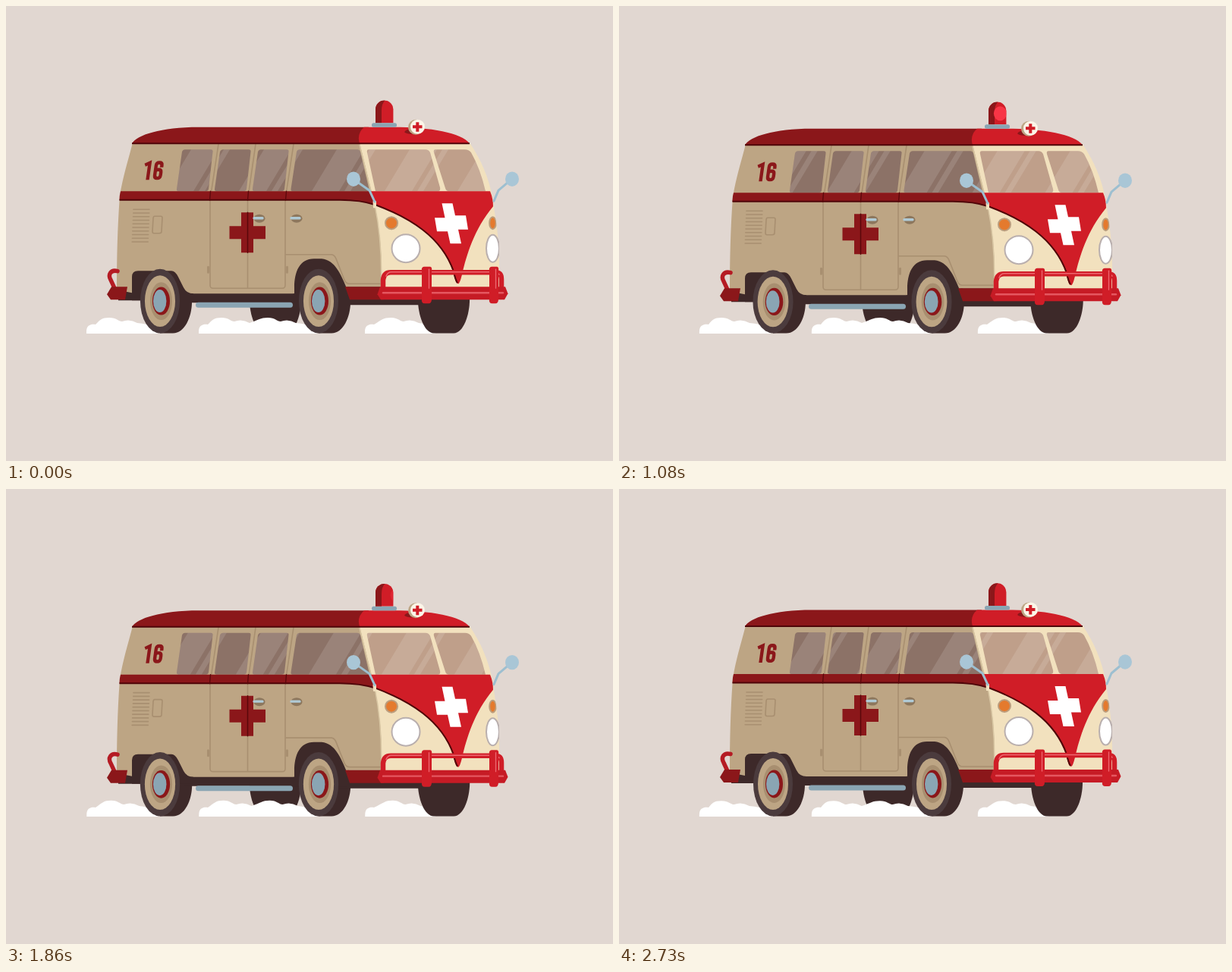
These frames come from a looping animation (800 px wide and 600 px high, 2760 ms). An HTML page:

```html
<!DOCTYPE html>
<html lang="en">
<head>
<meta charset="utf-8">
<title>Ambulance van</title>
<style>
  html, body { margin: 0; width: 100%; height: 100%; overflow: hidden; background: #e1d7d1; }
  svg { display: block; width: 100vw; height: 100vh; }
  .red { fill: #d01d27; }
  .maroon { fill: #8b171a; }
  .tan { fill: #bda584; }
  .dark { fill: #3d2929; }
  .cream { fill: #f2e1be; }
  .steel { fill: #8aa5b3; }
  .line { fill: none; stroke-linecap: round; stroke-linejoin: round; }
  .seam { stroke: #a88f70; stroke-width: 1.6; }
  .edge { stroke: #4f0509; stroke-width: 2; stroke-linecap: butt; }
  .chrome { stroke: #9dbfd0; stroke-width: 3; }
</style>
</head>
<body>
<svg viewBox="0 0 800 600" role="img" aria-label="Ambulance van number 16">
  <defs>
    <pattern id="glare" width="96" height="60" patternUnits="userSpaceOnUse">
      <path d="M0 0h36v60h-36zM43 0h8v60h-8z" fill="#fff" opacity=".12"/>
    </pattern>
    <clipPath id="dome"><path d="M487 154V136a11.7 11.7 0 0 1 23.4 0V154z"/></clipPath>
    <clipPath id="nose"><path d="M600 181H611C626 202 637 228 641 252L650 310V374H600z"/></clipPath>
    <path id="tread" class="dark" d="M0-42.5H17C32-42.5 42-22 42 0S32 42.5 17 42.5H0z"/>
    <g id="face">
      <ellipse rx="26" ry="42.5" fill="#4b3b3d"/>
      <ellipse rx="20" ry="34" class="tan"/>
      <ellipse cx="1.5" rx="14.5" ry="25" fill="#a88f70"/>
      <ellipse cx="1.5" rx="11.5" ry="18.5" class="maroon"/>
      <ellipse cx="-.3" rx="8.7" ry="15" class="steel"/>
    </g>
    <path id="farWheel" class="dark" d="M-34-20V-2C-34 18-26 42.500-13 42.500H13C26 42.500 34 18 34-2V-20z"/>
  </defs>
  <rect width="800" height="600" fill="#e1d7d1"/>

  <g data-wheel="355"><use href="#farWheel"/></g>
  <g id="smoke" fill="#fff"></g>
  <g data-wheel="577"><use href="#farWheel"/></g>
  <g data-wheel="203"><use href="#tread"/></g>
  <g data-wheel="412"><use href="#tread"/></g>

  <g id="van">
    <path class="dark" d="M148 370H548V394H385V391H235V388H148z"/>
    <rect class="steel" x="250" y="390.5" width="128" height="7" rx="3.5"/>

    <path class="tan" d="M167 180H468L490 262C494 290 496 330 494 370H452L378 379H243L166 378L146 374C146 330 147 290 150 250C154 225 161 203 167 180z"/>
    <path class="dark" d="M166 379V357Q166 349 174 349H218Q223 349 227 357L234 371Q238 379 247 379V388H166z"/>
    <path class="dark" d="M380 392V371C380 350 387 333 406 333H416C434 335 441 353 450 374V392z"/>
    <path class="maroon" d="M447 370H498V387H453z"/>
    <path class="line" d="M147 349.500C138 347 134 354 138 361L144 374" stroke="#b51b24" stroke-width="5.500"/>
    <path class="maroon" d="M139 370H160L157 387H138L133 380z"/>

    <g class="line seam">
      <path d="M280 182L269 255V368Q269 372 273 372H364Q368 372 368 368V255L379 182M329 182L318.500 255V372"/>
      <path d="M369 327.500H429Q433 328 435 333L446 361Q448 366 453 366H493"/>
      <path d="M196 277H204Q206 277 206 279L205 297Q205 299.500 202 299.500H195Q193 299.500 193 297L194 280Q194 277 196 277z"/>
      <path d="M266.500 344V351M370.500 344V351" stroke-width="3"/>
      <g id="vents"></g>
    </g>

    <path class="cream" d="M466 180H611C626 202 637 228 641 252L643 265Q650 305 650 340V373H495Q497 315 486 262z"/>
    <path class="line" d="M466 183Q476 225 486 262Q496 310 494.500 370" stroke="#d8c6a3" stroke-width="1.500"/>

    <g id="windows"></g>

    <path class="maroon" d="M151 244H480L487 262C470 257 460 255.500 440 255.500H149.500Q149.500 249 151 244z"/>
    <path class="red" d="M479 244H638Q642 253 642 264C617 294 607 328 601 354Q598 366 596 366Q592 366 590 352C574 304 532 279 487 262z"/>
    <path class="line edge" d="M149.500 255.500H440C462 255.500 475 258 487 262C532 279 574 304 590 350Q592 360 595 365"/>
    <path class="line" d="M269.500 244L268.500 256M319.500 244L318.500 256M369.500 244L368.500 256" stroke="#5a080b" stroke-width="1.300"/>

    <path class="maroon" d="M166 181C172 170 204 159.500 254 159.500H478V181z"/>
    <path class="red" d="M472 159.500H510C560 159.500 600 167 611 181H466Q462 168 472 159.500z"/>
    <path class="line edge" d="M166 181H611"/>

    <g class="line" stroke="#8b171a" stroke-width="4.400" stroke-linecap="butt" transform="translate(182 204) skewX(-8)">
      <path d="M2 5.500L8 2.500V25" style="stroke-linecap:butt;stroke-linejoin:miter"/>
      <path d="M24.300 8.500V6Q24.300 2.300 20.500 2.300T16.700 6V19Q16.700 22.900 20.500 22.900T24.300 19V15Q24.300 11.500 20.500 11.500Q17.500 11.500 16.700 14" style="stroke-linecap:butt"/>
    </g>

    <path class="maroon" d="M310 272H326V290H342V307H326V325H310V307H294.500V290H310z"/>
    <path class="line" d="M318.500 272V325" stroke="#5a080b" stroke-width="1.500"/>
    <g fill="#8d775d"><ellipse cx="334" cy="280" rx="7.500" ry="5.500"/><ellipse cx="383" cy="280" rx="7.500" ry="5.500"/></g>
    <path class="line" d="M327 279.500H338M376 279.500H387" stroke="#b0cad5" stroke-width="3.400"/>

    <path fill="#fff" d="M574.500 260H588.500L592 276H606L609 294.500H596L600 313H585.500L582 297H568L565 279H578.500z"/>

    <g stroke="#b9afae" stroke-width="2">
      <circle cx="527" cy="319.500" r="18.500" fill="#fff"/>
      <circle cx="508" cy="286" r="8" fill="#e47a2e" stroke="#bc9d7d"/>
      <g clip-path="url(#nose)">
        <ellipse cx="641.500" cy="319.500" rx="8.500" ry="18" fill="#fff"/>
        <ellipse cx="641.500" cy="286" rx="4.300" ry="8" fill="#e47a2e" stroke="#bc9d7d"/>
      </g>
    </g>

    <path class="cream" d="M483.500 257H488V266H484z"/>
    <path class="line chrome" d="M462 231L479 243L486 258M662 232L649 243L643 257"/>
    <g fill="#a9c6d6"><ellipse cx="458" cy="228" rx="9" ry="9.700"/><ellipse cx="667" cy="228" rx="9" ry="9.700"/></g>

    <rect class="steel" x="482" y="154" width="33" height="5.500" rx="2.500"/>
    <g clip-path="url(#dome)">
      <rect class="red" x="486" y="123" width="26" height="32"/>
      <path class="maroon" d="M486 155V123H501Q495 127 495 138V155z"/>
      <ellipse id="flash" cy="139.500" rx="8.500" ry="9.500" fill="#f83546"/>
    </g>

    <path class="maroon" d="M525 166Q527 162 535 162L544 168Q530 170 525 166z"/>
    <circle cx="540" cy="159.500" r="10" class="tan"/>
    <circle cx="542.500" cy="159" r="9.500" fill="#fbf5e8"/>
    <path class="red" d="M540.300 153H544.300V157H548.500V161H544.300V165.500H540.300V161H536V157H540.300z"/>

    <path class="line" d="M497 373V361Q498 351 507 351H645Q653 351 653 360V373" stroke="#d01d27" stroke-width="6.500"/>
    <path class="line" d="M501 356Q503 350.500 508 350.500H643Q648 350.500 650 354" stroke="#ee6770" stroke-width="1.500"/>
    <path fill="#c61b25" d="M493 370H658L661.500 379L657 387H494L489.500 380z"/>
    <path class="line" d="M497 378H655" stroke="#e55760" stroke-width="2.400"/>
    <g id="posts" class="red"></g>
  </g>

  <g data-wheel="203"><use href="#face"/></g>
  <g data-wheel="412"><use href="#face"/></g>
</svg>
<script>
const LOOP = 2760, STEP = 30, TAU = Math.PI * 2;
const find = id => document.getElementById(id);

const range = (count, make) => Array.from({ length: count }, (_, i) => make(i)).join('');

find('vents').innerHTML = range(10, i =>
  `<path d="M${168 - i * .2} ${268 + i * 4.75}H${189 - i * .2}"/>`);

find('posts').innerHTML = [[547, 15], [636, 14]].map(([x, w]) =>
  `<path d="M${x + 4} 343.500H${x + w - 3}Q${x + w} 344 ${x + w - 1} 349V386Q${x + w - 1} 392 ${x + w - 5} 392H${x + 5}Q${x} 392 ${x + 1} 386V349Q${x} 344 ${x + 4} 343.500z"/>
   <path class="line" d="M${x + w - 4.500} 347V372" stroke="#ee6770" stroke-width="1.300"/>`).join('');

const sideGlass = '#8c7267', frontGlass = '#bf9f8a';
const sidePane = x =>
  `M${x + 11} 189H${x + 45}Q${x + 48} 189 ${x + 47.500} 192L${x + 42} 241Q${x + 41.500} 244 ${x + 38} 244H${x + 3}Q${x - .5} 244 ${x} 241L${x + 7} 192Q${x + 8} 189 ${x + 11} 189z`;
const panes = [
  ...[225, 275, 325].map(x => [sidePane(x), sideGlass]),
  ['M387 189H463Q466 189 467 192L479 244H378Q375 244 375.500 241L383 192Q384 189 387 189z', sideGlass],
  ['M478 189H553Q557 189 559 193L572 239Q573 244 569 244H487L476 193Q475 189 478 189z', frontGlass],
  ['M566 189H605Q610 189 613 193Q625 214 632 244H584Q580 244 579 240L564 193Q563 189 566 189z', frontGlass]
];
find('windows').innerHTML = panes.map(([d, fill]) =>
  `<path d="${d}" fill="${fill}"/><path d="${d}" fill="url(#glare)"/>`).join('');

const puff = (x, peaks, end, sway) => {
  const left = x + sway * .4;
  let d = `M${left} 432V429C${left} 421 ${x + 6} 419 ${x + 12} 420`;
  for (const peak of peaks) {
    const top = x + peak + sway * 3.5;
    d += `C${top - 12} 414 ${top - 10} ${411 - sway * .4} ${top} ${411 - sway * .4}`
      + `S${top + 12} 416 ${top + 17} 416Q${top + 27} 412 ${top + 37} 418`;
  }
  return `<path d="${d}Q${end} 420 ${end} 432z"/>`;
};

// Ease between the highest and lowest position of the suspension.
const easeInOut = u => u < .5 ? 4 * u ** 3 : 1 - 4 * (1 - u) ** 3;
const dip = phase => {
  const distance = Math.abs(((phase - .365 + 1.5) % 1) - .5);
  return 2.5 * (1 - easeInOut(distance * 2));
};

const van = find('van'), flash = find('flash'), smoke = find('smoke'), glare = find('glare');
const wheels = [...document.querySelectorAll('[data-wheel]')];

function render(time) {
  const loop = Math.floor((time % LOOP) / STEP) * STEP / LOOP;
  const drop = dip(loop * 9 % 1);
  van.setAttribute('transform', `translate(0 ${drop})`);
  for (const wheel of wheels) {
    wheel.setAttribute('transform',
      `translate(${wheel.dataset.wheel} 431.500) scale(${1 + drop * .01} ${1 - drop * .01}) translate(0 -42.500)`);
  }

  const sweep = loop * 6 % 1;
  flash.setAttribute('cx', 517 - 42 * sweep);
  flash.setAttribute('opacity', Math.min(1, sweep / .12));
  glare.setAttribute('patternTransform', `translate(${-96 * sweep + 148} 189) skewX(-31)`);

  const sway = Math.sin(loop * 5 * TAU);
  smoke.innerHTML = puff(106, [30], 200, sway)
    + puff(254, [30, 91], 410, sway) + puff(473, [34], 566, sway);
}

const start = performance.now();
function tick() {
  render(performance.now() - start);
  requestAnimationFrame(tick);
}
tick();
</script>
</body>
</html>
```
